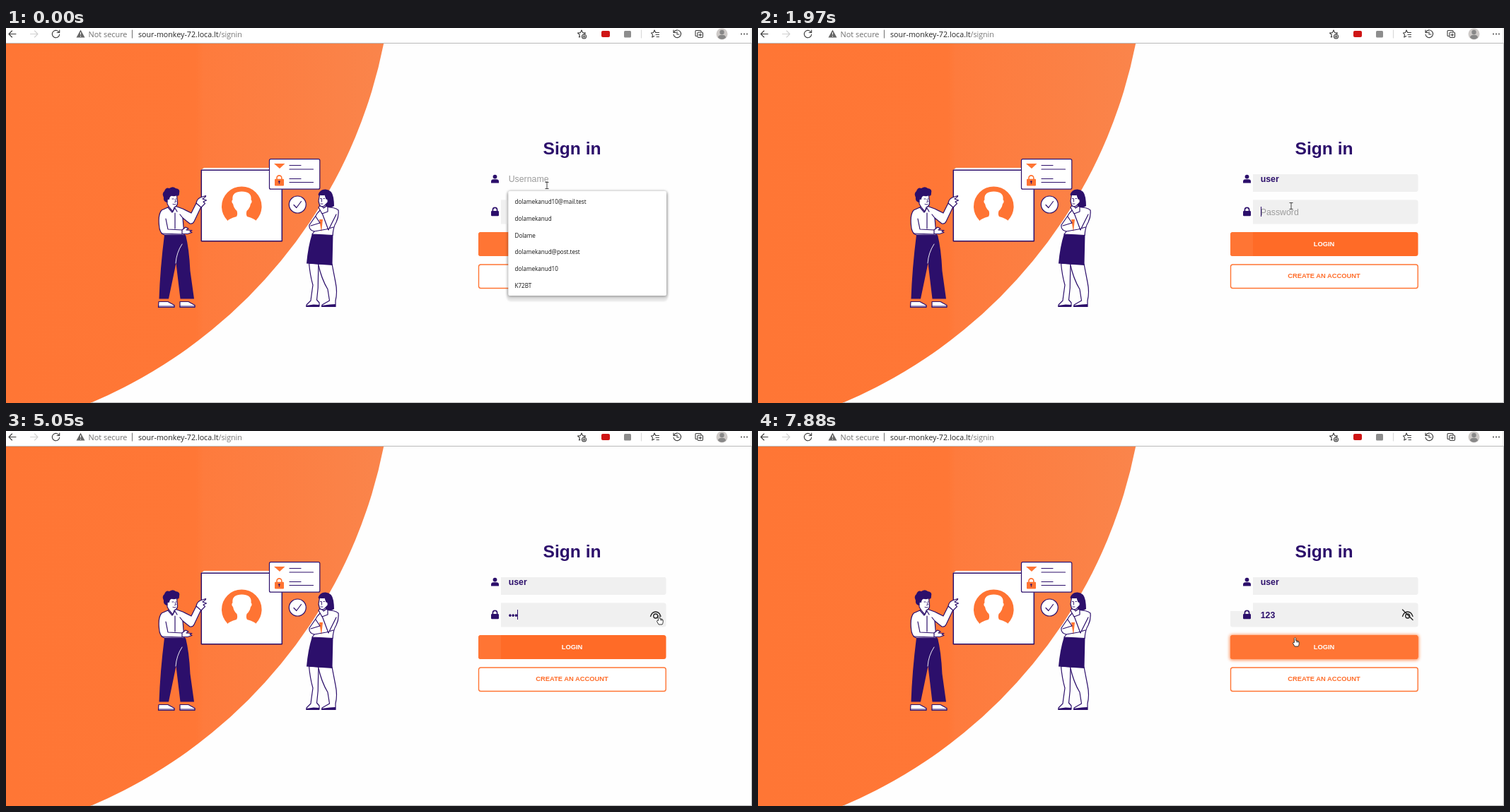
These frames come from a looping animation (1055 px wide and 531 px high, 8 s). An HTML page:

```html
<!DOCTYPE html>
<html lang="en">
<head>
<meta charset="utf-8">
<title>Sign in</title>
<style>
  html, body { margin: 0; width: 100%; height: 100%; overflow: hidden; background: #fff; }
  svg { display: block; width: 100%; height: 100%; }
  text { font-family: "Liberation Sans", Arial, sans-serif; white-space: pre; }
  .ui, .ui text { font-family: "Open Sans", "Noto Sans", sans-serif; }
  .line { fill: none; stroke: #2c0f6b; stroke-width: 1.2; stroke-linecap: round; stroke-linejoin: round; }
  .paper { fill: #fff; stroke: #2c0f6b; stroke-width: 1.2; stroke-linejoin: round; }
  .thin { stroke-width: .9; }
  .thick { stroke-width: 1.5; }
  .dark { fill: #2c0f6b; }
  .warm { fill: #ff7433; }
  .grey { fill: #f0f0f0; }
  .icon { fill: none; stroke: #3c3c3c; stroke-width: 1.1; stroke-linecap: round; stroke-linejoin: round; }
  .field { font-size: 12.32px; }
  .value { font-weight: 700; fill: #2c0f6b; }
  .hint { fill: #9c9c9c; }
  .label { font-size: 9.33px; font-weight: 700; text-anchor: middle; }
  #rows { font-size: 8.1px; fill: #111; }
</style>
</head>
<body>
<svg viewBox="0 0 1055 531" preserveAspectRatio="none">
  <defs>
    <linearGradient id="sun" gradientUnits="userSpaceOnUse" x1="0" x2="548">
      <stop offset="0" stop-color="#ff7635"/>
      <stop offset=".49" stop-color="#ff7736"/>
      <stop offset=".51" stop-color="#fe7b3d"/>
      <stop offset=".73" stop-color="#fc7f43"/>
      <stop offset="1" stop-color="#fa854c"/>
    </linearGradient>
    <clipPath id="page"><rect y="22" width="1055" height="509"/></clipPath>
    <clipPath id="button"><rect x="668" y="289" width="265.5" height="34" rx="3.5"/></clipPath>
    <filter id="soft" x="-10%" y="-30%" width="120%" height="160%"><feGaussianBlur stdDeviation="2"/></filter>
    <filter id="faint" x="-10%" y="-30%" width="120%" height="160%"><feGaussianBlur stdDeviation=".8"/></filter>
  </defs>

  <rect width="1055" height="531" fill="#fefefe"/>
  <circle cx="-152.5" cy="-114" r="700" fill="url(#sun)" clip-path="url(#page)"/>

  <!-- Browser bar -->
  <rect width="1055" height="21.5" fill="#fff"/>
  <path d="M0 21.5H1055M1054.5 22V531M120 530.5H1055" stroke="#b9b9b9" fill="none"/>
  <g class="icon">
    <path d="M14 8.5H4M8.5 4L4 8.5L8.5 13"/>
    <path d="M34.5 8.5H45M40.5 4L45 8.5L40.5 13" stroke="#d0d0d0"/>
    <path d="M75.3 6.5A5.2 5.2 0 1 0 75.7 9M75.7 3V6.5H72.2"/>
    <path d="M178.5 3V14" stroke="#777"/>
    <path d="M898.5 3V14M1054 0V21" stroke="#d8d8d8"/>
    <path d="M814 3L815.6 6.6L819.5 7L816.6 9.6M812 12.3L810.5 13L811.3 9.6L808.5 7L812.4 6.6L814 3"/>
    <circle cx="817.5" cy="12" r="3" fill="#fff"/><path d="M816 12H819M817.5 10.5V13.5"/>
    <path d="M917 3L918.7 6.5H923.5M919 9.5H923.5M920 12.5H923.5M916.7 11.5L913.7 13L914.5 9.5L912.5 7L915.6 6.5L917 3"/>
    <path d="M944.5 6A5.3 5.3 0 1 1 944 9M944 3V6.5H947.5M949 5.5V9H952"/>
    <path d="M977 11.5H976Q975 11.5 975 10.5V4.5Q975 3.5 976 3.5H982Q983 3.5 983 4.5V5.5"/>
    <rect x="978" y="6" width="7.5" height="7.5" rx="1.5"/><path d="M980 9.7H983.7M981.8 8V11.5"/>
  </g>
  <path d="M105.5 2.5L111.5 13.5H99.5Z" fill="#666"/><path d="M105.5 6V9.5M105.5 11V12.2" stroke="#fff"/>
  <rect x="842" y="4" width="12" height="9" rx="2" fill="#cf1515"/>
  <rect x="874" y="4" width="10" height="9.5" rx="1.5" fill="#8d8d8d"/>
  <circle cx="1012.5" cy="8.5" r="8" fill="#cecac8"/>
  <circle cx="1012.5" cy="6" r="3.2" fill="#888"/><path d="M1007 13.5Q1007 9.8 1012.5 9.8T1018 13.5Q1012.5 18.5 1007 13.5Z" fill="#888"/>
  <path d="M1040 8.5H1049.5" stroke="#333" stroke-width="1.8" stroke-linecap="round" stroke-dasharray="0 4"/>
  <g class="ui">
    <text x="116.5" y="12.5" font-size="10.9" fill="#707070">Not secure</text>
    <text x="187" y="12.5" font-size="10.7" fill="#262626">sour-monkey-72.loca.lt<tspan fill="#777">/signin</tspan></text>
  </g>

  <!-- Board, card and tick -->
  <path d="M276 201L280 198H372V201Z" fill="#fff"/>
  <rect class="paper thick" x="276.3" y="201.3" width="114" height="100.5"/>
  <circle class="warm" cx="333.3" cy="252.7" r="28.3"/>
  <path d="M304 284V277L313 273.5Q315 270 326 267Q328 264 326.5 259Q322 255 321 249Q318 246 320.500 243Q319 232 333.5 231.5Q348 232 346.5 243Q349 246 346 249Q345 255 340.5 259Q339 264 341 267Q352 270 354 273.5L363 277V284Z" fill="#fff"/>
  <rect class="paper" x="372.5" y="185.7" width="71.3" height="42.5" rx="2"/>
  <path class="warm" d="M379 192H394.5L387 199Z"/>
  <rect class="warm" x="380" y="213.7" width="13" height="9.8" rx="1"/>
  <path d="M383 215V212.3A3.4 3.4 0 0 1 389.8 212.3V215" fill="none" stroke="#ff7433" stroke-width="1.6"/>
  <circle class="dark" cx="386.4" cy="217.5" r="1.2"/><path class="line thin" d="M386.4 218V220.5"/>
  <path class="line" d="M401 194.5H417M401 200H434.5M401 213.5H417M401 218.5H434.5"/>
  <circle class="paper" cx="412.3" cy="250" r="12"/>
  <path class="line" d="M407 250.5L410.8 254.5L417.5 245.5"/>

  <!-- Man -->
  <path class="dark" d="M224 293H254Q259 312 260.5 344L266 383.5H246.5L240.5 333L230 383.5H216.5Q218 340 224 293Z"/>
  <path class="line thin" d="M240 333Q241 318 249 306" style="stroke:#fff"/>
  <path class="paper" d="M216 387.5H229L238 392.5V395.5H215.5ZM246 387.5H258L267 392.5V395.5H246Z"/>
  <path class="line" d="M215.5 394H238M246 394H267"/>
  <path class="paper" d="M231 253L220 258Q215 264 216.5 279Q217 291 224 293H252L250 269L260 277Q264 278 266 274L276 253L269 248L262 262L250 256L239 252Z"/>
  <path class="paper" d="M269 248Q270 242 275 240L282.5 237.5Q283.5 238.5 278 242L283.5 244L279 246L281.5 248.5L276 254Z"/>
  <path class="line" d="M226 270L229 285L250 286M220 291L249 292M239 262V284M229 254L235 261L239 255L242 260M250 269L246 264"/>
  <path class="paper" d="M249 286L254 282L258 284L255 286L263 286.5L260 288L263 289.5L257 291.5H249Z"/>
  <path class="paper" d="M228 238V249L231 254L236 260L238 254Q243 252 242.5 247L241.5 236Z"/>
  <path class="dark" d="M227 247Q222 245 223 240Q220 234 224 231Q226 225 231 227Q236 223.5 240 227Q247 228 245 234Q245 239 241 237.500Q237 239 234 237.500Q231 239 231 243Q229 242 228 244Q229 247 227 247Z"/>
  <path class="line thin" d="M235 242H237M240 242H241M239 243L240.5 246L238.5 246.5M236 249.5Q238 250.5 240 249.5"/>

  <!-- Woman -->
  <path class="paper" d="M428.500 333Q430 350 434 364Q432 378 431 386L425 392V394.500L443 394V389L439.500 385Q442 368 441.500 352L442 334Z"/>
  <path class="paper" d="M441.500 334Q446 355 455 370L457.500 386L447 392V394.500H466V386Q469 374 466 360L461 334Z"/>
  <path class="dark" d="M424.5 393L435 391.5L443 392V395H424.5ZM446 393L458 391.5L466 391V395H446ZM433 291H462.5L461.5 336L425 333.5Q427 310 433 291Z"/>
  <path class="paper" d="M452 253Q442 258 438 266L429 279Q428 286 436 288L433 292L462 293.5Q463 281 467 275Q471 267 470 258Q467 255 459 254Z"/>
  <path class="warm" d="M443 271H448L446 289Z"/>
  <path class="line" d="M436 288L453 285L463 282M431 280L444 276M467 264L456 286L447 262M438 267L444 276"/>
  <path class="paper" d="M447 263L442 254L445 250L449 255L455 251V260Z"/>
  <path class="dark" d="M441.5 236Q444 228 452 228.5Q461 229 463 240Q464 246 464 252Q459 256 453 253L447 243Z"/>
  <path class="paper" d="M443.5 236L442 245L443.5 251Q446 254 450 252L455 247Q456 242 453 242L451 236Q447 237 443.5 236Z"/>
  <path class="line thin" d="M444.5 241.5H446M449 241.5H450.5M446.5 242V246M445 249H448"/>

  <!-- Form -->
  <text x="800.5" y="179" font-size="24.64" font-weight="700" fill="#2c0f6b" text-anchor="middle">Sign in</text>
  <path class="grey" id="userBox" d="M700 207H931Q933.5 207 933.5 210V229Q933.5 232 930.5 232H700Z"/>
  <rect id="halo" x="708" rx="6" filter="url(#faint)"/>
  <path class="grey" d="M700 243.5H930.5Q933.5 243.5 933.5 246.5V274.5Q933.5 277.5 930.5 277.5H700Z"/>
  <path class="grey" id="tab" d="M668 255H700V277.5H671Q668 277.5 668 274.5Z"/>
  <g class="dark">
    <circle cx="691.5" cy="210.6" r="2.9"/>
    <path d="M686 219.5V217.5Q686 214.2 689.5 214.2H693.5Q697 214.2 697 217.5V219.5Z"/>
    <rect x="686" y="259" width="11" height="7.3" rx="1.2"/>
  </g>
  <path d="M688.4 260V257.5A3.1 3.1 0 0 1 694.6 257.5V260" fill="none" stroke="#2c0f6b" stroke-width="1.7"/>
  <text class="field" id="user" x="710.7" y="218"></text>
  <text class="field" id="pass" x="710.7" y="264.5"></text>
  <g class="icon" id="eye" style="stroke:#222;stroke-width:1.3">
    <path d="M911.5 262.5Q913.5 256 918.7 256T926 262.5"/><circle cx="918.7" cy="262" r="3"/>
    <path id="slash" d="M911.5 253L926 267.5"/>
  </g>
  <rect id="glow" x="667" y="288.5" width="267.5" height="36" rx="4" fill="#ff6a22" filter="url(#soft)"/>
  <g clip-path="url(#button)">
    <rect x="668" y="289" width="266" height="34" fill="#ff6b27"/>
    <rect id="tint" x="668" y="289" height="34" fill="#ff7534"/>
  </g>
  <text class="label" x="800.5" y="309.3" fill="#fff">LOGIN</text>
  <rect x="668.5" y="335" width="264.7" height="33.5" rx="3" fill="#fff" stroke="#ff7433" stroke-width="1.4"/>
  <text class="label" x="800.5" y="354.4" fill="#ff6d2a">CREATE AN ACCOUNT</text>

  <g id="popup">
    <rect id="shade" x="710" y="233" width="224.5" rx="2" fill="#000" opacity=".42" filter="url(#soft)"/>
    <rect id="sheet" x="710.3" y="231" width="223.7" rx="2" fill="#fff"/>
    <g id="rows" class="ui"></g>
  </g>
  <path id="caret" stroke="#2c0f6b"/>
  <g id="pointer">
    <path id="beam" d="M-2.5 -4.5H2.5M0 -4.5V4.5M-2.5 4.5H2.5" fill="none" stroke="#444"/>
    <path id="hand" d="M-2.6 1V-5Q-1.5 -7.2 -.4 -5V-1.6Q3.8 -1.8 4.2 .5V3Q4 5 3 6.5H-2L-4.5 2.2Q-4.5 .2 -2.6 1ZM1 -1.5V1M2.7 -1V1" fill="#fff" stroke="#222" stroke-width=".9" stroke-linejoin="round"/>
    <path id="arrow" d="M-4 -6V5L-1.5 2.7L.2 6.3L2 5.5L.4 2H4Z" fill="#fff" stroke="#222" stroke-width=".8"/>
  </g>
</svg>
<script>
const LOOP = 8000;
const $ = id => document.getElementById(id);
const accounts = ["dolamekanud10@mail.test", "dolamekanud", "Dolame", "dolamekanud@post.test", "dolamekanud10", "K72BT"];

const at = (shape, x, y) => ({ shape, x, y });
const beam = (x, y) => at("beam", x, y);
const hand = (x, y) => at("hand", x, y);
const off = { caret: 0 };

// Each step holds until the next; unnamed values carry over.
const steps = [
  [0, { user: "", pass: "", caret: 0, line: 207, rows: accounts, eye: 0, tint: 42, tab: 0, glow: 0, ...beam(765, 223) }],
  [290, { user: "u", caret: 717.5, rows: ["user"], tint: 32 }],
  [440, { user: "us", caret: 725.5 }],
  [740, { user: "use", caret: 732.5 }],
  [860, { user: "user", caret: 736.5, rows: [] }],
  [1450, { ...off, ...beam(762, 230) }],
  [1570, beam(757, 245)],
  [1690, beam(754, 252)],
  [1970, { caret: 711.5, line: 253 }],
  [2530, { pass: "•", caret: 715, eye: 1 }],
  [2810, { pass: "••", caret: 719.2 }],
  [2980, { pass: "•••", caret: 723.5 }],
  [3430, beam(755, 252)],
  [3580, off],
  [3730, beam(826, 264)],
  [3850, hand(925, 273)],
  [4000, at("arrow", 953, 272)],
  [4120, { caret: 723.5, ...hand(909, 263) }],
  [4270, hand(912, 262)],
  [4390, hand(915, 262)],
  [4540, hand(914, 265)],
  [4660, { ...off, ...hand(913, 269) }],
  [4780, hand(914, 271)],
  [4900, hand(916, 270)],
  [5050, { caret: 723.5, ...hand(925, 267.5) }],
  [5200, { ...off, ...hand(925, 268) }],
  [5350, { pass: "123", eye: 2 }],
  [5590, hand(918, 272)],
  [5710, hand(880, 286)],
  [5830, hand(818, 292)],
  [5950, beam(764, 272)],
  [6070, beam(727, 260)],
  [6220, beam(730, 266)],
  [6370, { tint: 266, tab: 1, ...hand(754.5, 306) }],
  [6520, { glow: 0.4, ...hand(746, 312.5) }],
  [6640, { glow: 0.8 }],
  [6910, hand(747, 313)],
  [7490, hand(746, 313)],
  [7640, hand(748, 309)],
  [7760, hand(755, 303)],
  [7880, hand(761, 298.5)],
];

let held = {};
const states = steps.map(([time, change]) => [time, held = { ...held, ...change }]);

const show = (id, on) => $(id).style.display = on ? "" : "none";
const set = (id, name, value) => $(id).setAttribute(name, value);

function fillField(id, value, hint) {
  $(id).textContent = value || hint;
  set(id, "class", "field " + (value ? "value" : "hint"));
}

function drawPopup(rows) {
  show("popup", rows.length);
  show("halo", rows.length);
  if (!rows.length) return;
  const full = rows.length > 1;
  const height = full ? 148 : 30;
  set("sheet", "height", height);
  set("shade", "height", height - 1);
  set("halo", "y", full ? 229 : 236);
  set("halo", "height", full ? 158 : 34);
  set("halo", "width", full ? 228 : 231);
  set("halo", "fill", full ? "#e6e6e6" : "#f0f0f0");
  $("rows").innerHTML = rows.map((row, i) => `<text x="719.5" y="${249 + i * 23.75}">${row}</text>`).join("");
}

function draw(s) {
  fillField("user", s.user, "Username");
  fillField("pass", s.pass, "Password");
  show("userBox", s.user);
  drawPopup(s.rows);
  show("eye", s.eye);
  show("slash", s.eye === 2);
  show("tab", s.tab);
  set("tint", "width", s.tint);
  set("glow", "opacity", s.glow);
  show("caret", s.caret);
  set("caret", "d", `M${s.caret} ${s.line}v14`);
  for (const shape of ["beam", "hand", "arrow"]) show(shape, shape === s.shape);
  set("pointer", "transform", `translate(${s.x} ${s.y})`);
}

let drawn;
const start = performance.now();
function tick() {
  const time = (performance.now() - start) % LOOP;
  const state = states.findLast(([from]) => from <= time)[1];
  if (state !== drawn) draw(drawn = state);
  requestAnimationFrame(tick);
}
tick();
</script>
</body>
</html>
```
